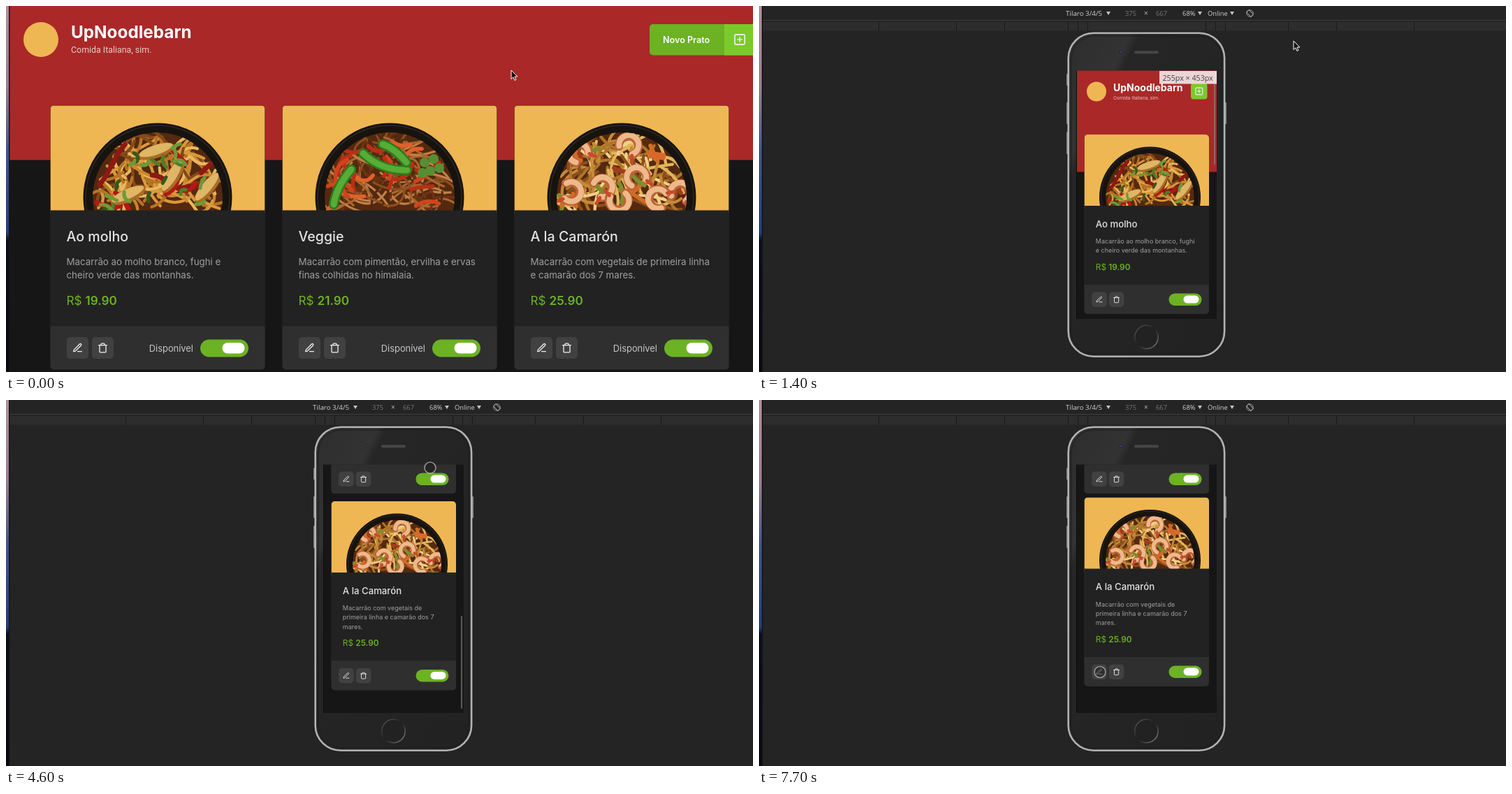
Animation of 1069 by 524 pixels, one loop 8000 ms. Source, as an HTML page:

```html
<!DOCTYPE html>
<html lang="pt-BR">
<head>
<meta charset="utf-8">
<title>Cardápio</title>
<style>
html, body { margin: 0; width: 100%; height: 100%; overflow: hidden; background: #242424; }
svg { display: block; }
text { font-family: Inter, sans-serif; white-space: pre; }
.ui { font-family: "Open Sans", sans-serif; }
.sub { font-family: Roboto, sans-serif; }
.icon { fill: none; stroke: #f2f2f2; stroke-width: 2; stroke-linecap: round; stroke-linejoin: round; }
</style>
</head>
<body>
<svg id="stage" width="1069" height="524" viewBox="0 0 1069 524"></svg>
<script>
const LOOP = 8000;
const GREEN = '#6cb223', LIME = '#7bca2b', RED = '#aa2828', AMBER = '#eeb754';

const rect = (x, y, w, h, fill, r = 0, extra = '') =>
  `<rect x="${x}" y="${y}" width="${w}" height="${h}" rx="${r}" fill="${fill}" ${extra}/>`;
const circle = (x, y, r, fill, extra = '') => `<circle cx="${x}" cy="${y}" r="${r}" fill="${fill}" ${extra}/>`;
const text = (x, y, size, fill, content, extra = '') =>
  `<text x="${x}" y="${y}" font-size="${size}" fill="${fill}" ${extra}>${content}</text>`;
const ui = (x, y, size, fill, content, extra = '') => text(x, y, size, fill, content, `class="ui" ${extra}`);
const line = (d, color, width, extra = '') =>
  `<path d="${d}" fill="none" stroke="${color}" stroke-width="${width}" stroke-linecap="round" ${extra}/>`;
const group = (x, y, body, extra = '') => `<g transform="translate(${x} ${y})" ${extra}>${body}</g>`;

const ICONS = {
  edit: 'M12 20h9M16.5 3.5a2.1 2.1 0 0 1 3 3L7 19l-4 1 1-4z',
  trash: 'M3 6h18M19 6v14a2 2 0 0 1-2 2H7a2 2 0 0 1-2-2V6M8 6V4a2 2 0 0 1 2-2h4a2 2 0 0 1 2 2v2',
  plus: 'M5 3h14a2 2 0 0 1 2 2v14a2 2 0 0 1-2 2H5a2 2 0 0 1-2-2V5a2 2 0 0 1 2-2zM12 8v8M8 12h8'
};
const icon = (name, cx, cy, size) =>
  `<path class="icon" d="${ICONS[name]}" transform="translate(${cx - size / 2} ${cy - size / 2}) scale(${size / 24})"/>`;

function randomizer(seed) {
  return () => (seed = (seed * 16807) % 2147483647) / 2147483647;
}

// Curved strands scattered over the visible upper half of a bowl.
function strands(rnd, count, colors, width, length) {
  let out = '';
  for (let i = 0; i < count; i++) {
    const a = -Math.PI * (rnd() * 1.16 - 0.08), d = 88 * Math.sqrt(rnd());
    const turn = rnd() * 360, bend = (rnd() - 0.5) * length;
    const len = length * (0.6 + rnd() * 0.6);
    const color = colors[Math.floor(rnd() * colors.length)];
    out += line(`M${-len / 2} 0Q0 ${bend.toFixed(1)} ${len / 2} 0`, color, width,
      `transform="translate(${(Math.cos(a) * d).toFixed(1)} ${(Math.sin(a) * d).toFixed(1)}) rotate(${turn.toFixed(0)})"`);
  }
  return out;
}

const chicken = (x, y, turn) => group(x, y,
  `<g transform="rotate(${turn})"><ellipse rx="27" ry="9.5" fill="#a96c25"/><ellipse cy="-2" rx="25" ry="7" fill="#dfb566"/></g>`);
const pod = d => line(d, '#2c7a1f', 14) + line(d, '#55ad35', 9);
const shrimp = (x, y, turn) => group(x, y, `<g transform="rotate(${turn})">` +
  line('M-11 9A14 14 0 1 1 12 8', '#bd6339', 12) + line('M-11 8A14 14 0 1 1 11 7', '#edb98b', 8) +
  line('M12 9l5 8', '#c94a2c', 5) + '</g>');

const TOPPINGS = [
  rnd => strands(rnd, 100, ['#d9993c', '#b87424', '#e8b85e', '#84491a', '#c98730'], 4.2, 42) +
    strands(rnd, 11, ['#b01a16', '#8f1813'], 7, 34) +
    chicken(-2, -66, -18) + chicken(22, -30, -58) + chicken(-42, -3, -24) + chicken(72, -14, -50) +
    strands(rnd, 20, ['#4d7f29', '#6c9a38', '#35591c'], 5, 15),
  rnd => strands(rnd, 125, ['#8d4e20', '#a9672f', '#6b3413', '#bf8147', '#532812'], 3.2, 46) +
    strands(rnd, 22, ['#d2431b', '#e0602a', '#b82f14'], 5.5, 34) +
    pod('M-38-63Q-12-38 25-39') + pod('M-10-76Q8-70 24-50') + pod('M-80 10Q-76-16-55-40') +
    [[50, -50], [63, -55], [58, -38], [71, -42], [47, -35]].map(p => circle(...p, 7, '#568e35')).join(''),
  rnd => strands(rnd, 100, ['#e3b55c', '#c58a37', '#f0d189', '#8c4e1d', '#ad7629'], 4.2, 42) +
    strands(rnd, 14, ['#7d8d2e', '#a33b1b', '#d26b24'], 6, 24) +
    rect(37, -65, 26, 10, '#d9682b', 3, 'transform="rotate(8 49 -60)"') +
    shrimp(-61, -63, -35) + shrimp(-28, -14, 65) + shrimp(22, -28, -20) +
    shrimp(-73, -8, 100) + shrimp(84, -6, 20) + shrimp(-4, 4, 170) + shrimp(53, 2, -70) + shrimp(10, -74, 35)
];
const dish = (topping, i) => `<g id="dish${i}">` + circle(0, 0, 106.5, '#17130f') +
  circle(0, 0, 103, 'none', 'stroke="#2b2724" stroke-width="1.5"') +
  `<g clip-path="url(#bowl)">${circle(0, 0, 93, '#54290f')}${topping(randomizer(71 + i * 37))}</g></g>`;

const DISHES = [
  { name: 'Ao molho', price: '19.90',
    wide: ['Macarrão ao molho branco, fughi e', 'cheiro verde das montanhas.'],
    slim: ['Macarrão ao molho branco, fughi', 'e cheiro verde das montanhas.'] },
  { name: 'Veggie', price: '21.90',
    wide: ['Macarrão com pimentão, ervilha e ervas', 'finas colhidas no himalaia.'],
    slim: ['Macarrão com pimentão, ervilha', 'e ervas finas colhidas no himalaia.'] },
  { name: 'A la Camarón', price: '25.90',
    wide: ['Macarrão com vegetais de primeira linha', 'e camarão dos 7 mares.'],
    slim: ['Macarrão com vegetais de', 'primeira linha e camarão dos 7', 'mares.'] }
];
const WIDE = { key: 'wide', w: 307, head: 150, plate: [153.5, 131.5, 1], pad: 23, title: [194, 19.6], desc: [228, 13.3, 19.6],
  price: [285, 17.2], foot: 316, end: 378, btn: [23.5, 59.5, 31, 15.5], btnY: 331.5,
  sw: [214.5, 335, 69, 25], knob: [246, 339.5, 32, 15.5], label: true };
const SLIM = { key: 'slim', w: 178.5, head: 102, plate: [94, 90, 0.681], pad: 16.3, title: [132.5, 13.2], desc: [156, 9, 13.4],
  price: [194, 11.8], foot: 215, end: 257, btn: [10.7, 35.3, 21.5, 10.6], btnY: 225.5,
  sw: [121, 227.5, 47, 17.5], knob: [142, 230.5, 22, 11], label: false };

function card(i, L) {
  const item = DISHES[i], lines = item[L.key], more = (lines.length - 2) * L.desc[2];
  const [size, glyph] = L.btn.slice(2), by = L.btnY + more;
  const at = ([x, y, w, h], fill, id) => rect(x, y + more, w, h, fill, h / 2, `id="${id}${L.key}${i}"`);
  const head = `<g clip-path="url(#head-${L.key})" id="photo${L.key}${i}">${rect(0, 0, L.w, L.head + 8, AMBER)}
    <use href="#dish${i}" transform="translate(${L.plate[0]} ${L.plate[1]}) scale(${L.plate[2]})"/></g>`;
  return rect(0, 0, L.w, L.end + more, '#222', 5) + head +
    rect(0, L.head, L.w, L.foot + more - L.head, '#222') +
    rect(0, L.foot + more, L.w, L.end - L.foot, '#2f2f2f', 5) + rect(0, L.foot + more, L.w, 8, '#2f2f2f') +
    text(L.pad, L.title[0], L.title[1], '#e3e3e3', item.name, 'font-weight="500"') +
    lines.map((s, n) => text(L.pad, L.desc[0] + n * L.desc[2], L.desc[1], '#a0a0a0', s)).join('') +
    text(L.pad, L.price[0] + more, L.price[1], GREEN, `R$ <tspan font-weight="600">${item.price}</tspan>`) +
    ['edit', 'trash'].map((name, n) => rect(L.btn[n], by, size, size, '#414141', 5) +
      icon(name, L.btn[n] + size / 2, by + size / 2, glyph)).join('') +
    (L.label ? text(204.5, 352, 12.9, '#c4c4c4', 'Disponível', 'text-anchor="end"') : '') +
    at(L.sw, GREEN, 'switch') + at(L.knob, '#fff', 'knob');
}

const strip = rect(0, 0, 5, 524, 'url(#wallpaper)') + rect(4, 0, 1.5, 524, '#14141a');

const desktop = rect(0, 0, 1069, 524, '#161616') + rect(5, 0, 1064, 220.5, RED) +
  circle(50, 48, 25, AMBER) +
  text(93, 46, 24.3, '#fff', 'UpNoodlebarn', 'font-weight="700"') +
  text(93, 67, 12.4, '#eac9c3', 'Comida Italiana, sim.', 'class="sub"') +
  rect(921, 26, 160, 44.5, GREEN, 5) + rect(1028, 26, 41, 44.5, LIME) +
  text(940, 52.5, 12.6, '#fff', 'Novo Prato', 'font-weight="600"') + icon('plus', 1050, 48, 19) +
  DISHES.map((_, i) => group(63.5 + i * 332, 142.5, card(i, WIDE))).join('');

const TABS = [['Elements', 157], ['Network', 216], ['Application', 271], ['Console', 338], ['Sources', 391],
  ['Performance', 443], ['Memory', 516], ['Security', 570], ['Audits', 623]];
const DRAWER = [['Console', 123], ["What's New", 172], ['Remote devices', 246]];
const tabs = (list, y, active) => list.map(([name, x], i) =>
  ui(x, y, 9.6, i === active ? '#fff' : '#a9a9a9', name)).join('');
const inspector = rect(93, 88, 758, 323.5, '#242424', 4, 'style="filter:drop-shadow(0 2px 5px #000c)"') +
  rect(93, 88, 758, 30, 'url(#titlebar)', 5) + rect(93, 109, 758, 20.5, '#333') +
  rect(93, 129.5, 758, 1, '#444') + rect(93, 389, 758, 22, '#333') + rect(93, 389, 758, 1, '#4a4a4a') +
  ['#cf5850', '#e2b035', '#4fa352'].map((c, i) => circle(105 + i * 19, 99, 5.5, c)).join('') +
  ui(159, 103, 10.4, '#c9c9c9',
    'devtools://devtools/bundled/devtools_app.html?remoteBase=https://chrome-devtools-frontend.appspot.com/serve_file/@449cb163497',
    'font-weight="600"') +
  rect(148, 109, 59, 20, '#000') + rect(165, 390, 74, 20, '#000') +
  rect(143, 112, 1, 14, '#444') + rect(823, 112, 1, 14, '#444') +
  tabs(TABS, 123, 0) + tabs(DRAWER, 404, 1) +
  rect(93.5, 88.5, 757, 322.5, 'none', 4, 'stroke="#171717"');

const RULER = [171, 282, 351, 442, 456, 470, 639, 653, 667, 757, 826, 937];
const caret = x => `<path d="M${x} 8h6l-3 5z" fill="#c4c4c4"/>`;
const toolbar = rect(0, 0, 1069, 524, '#242424') + rect(5, 20, 1064, 1, '#3f3f3f') +
  rect(5, 23, 1064, 12.5, '#2d2d2d') + RULER.map(x => rect(x, 23, 1, 12.5, '#191919')).join('') +
  ui(439, 14, 9.8, '#d0d0d0', 'Tilaro 3/4/5') + caret(497) + ui(524, 14, 9.4, '#777', '375') + ui(551, 14, 10, '#bbb', '×') +
  ui(568, 14, 9.4, '#777', '667') + ui(606, 14, 9.5, '#d0d0d0', '68%') + caret(628) +
  ui(642, 14, 9.4, '#d0d0d0', 'Online') + caret(674) +
  `<g fill="none" stroke="#9a9a9a"><circle cx="702.5" cy="10.5" r="4.7"/><rect x="700" y="6" width="5" height="9" transform="rotate(-45 702.5 10.5)"/></g>`;

const phone = [[440, 97, 17], [440, 138, 31], [440, 180, 32], [666, 138, 31]]
    .map(([x, y, h]) => rect(x, y, 3, h, '#858585', 1)).join('') +
  rect(442.7, 38.7, 223.4, 463, 'url(#shell)', 36, 'stroke="#b3b3b3" stroke-width="2.6"') +
  rect(447, 43, 215, 454.5, 'none', 32, 'stroke="#1c1c1c"') +
  circle(518, 66, 2.2, '#22223c') + circle(518, 66, 1, '#5555a0') + rect(537, 64.3, 35, 4, '#464646', 2) +
  circle(554.5, 474, 16.7, '#222', 'stroke="url(#home)" stroke-width="1.6"');

const page = rect(454, 92, 201, 145.5, RED) + circle(483, 122.5, 14, AMBER) +
  text(507, 121.5, 14, '#fff', 'UpNoodlebarn', 'font-weight="700"') +
  text(507, 133.5, 7.1, '#e2bbb5', 'Comida Italiana, sim.', 'class="sub"') +
  rect(618, 110.5, 23.5, 23, LIME, 4) + icon('plus', 629.8, 122, 13) +
  DISHES.map((_, i) => group(465.5, 184 + i * 268, card(i, SLIM), `id="slim${i}"`)).join('');

const mobile = toolbar + `<g id="phone">${phone}</g>` + rect(454, 92.5, 201, 355.5, '#161616') +
  `<g clip-path="url(#screen)"><g id="page">${page}</g>` +
  rect(651, 94, 2, 133, '#8a8a8a', 1, 'id="bar" opacity=".6"') + rect(454, 92, 1, 356, '#0c0c0c') + '</g>' +
  `<g id="tip">${rect(573, 93, 82, 18.5, '#f3e2e2', 0, 'opacity=".93"')}${ui(577.5, 106.5, 10.7, '#444', '255px × 453px')}</g>` +
  rect(586.5, 382, 47, 18, '#4b7296', 0, 'id="tap" opacity=".4"') +
  circle(0, 0, 8, '#1b1b1b', 'id="touch" fill-opacity=".52" stroke="#cfcbc0" stroke-opacity=".65" stroke-width="1.6"');

const gradient = (id, coords, stops) => `<linearGradient id="${id}" ${coords}>` +
  stops.map(([o, c]) => `<stop offset="${o}" stop-color="${c}"/>`).join('') + '</linearGradient>';
const DOWN = 'x1="0" y1="0" x2="0" y2="1"', SLANT = 'x1="0" y1="0" x2="1" y2="1"';
const clip = (id, shape) => `<clipPath id="${id}">${shape}</clipPath>`;

document.getElementById('stage').innerHTML = '<defs>' +
  gradient('wallpaper', DOWN, [[0, '#b08f96'], [0.22, '#9a7c8c'], [0.4, '#41548a'], [0.62, '#233f78'], [0.64, '#0b0d1c'], [1, '#08080f']]) +
  gradient('titlebar', DOWN, [[0, '#424242'], [1, '#303030']]) +
  gradient('shell', SLANT, [[0, '#2d2d2d'], [0.2, '#333'], [0.23, '#262626'], [1, '#222']]) +
  gradient('home', SLANT, [[0, '#5d5d5d'], [0.5, '#1d1d1d'], [1, '#8b8b8b']]) +
  clip('bowl', circle(0, 0, 93, '#000')) + clip('screen', rect(454, 92.5, 201, 355.5, '#000')) +
  [WIDE, SLIM].map(L => clip('head-' + L.key, rect(0, 0, L.w, L.head + 8, '#000', 5))).join('') +
  TOPPINGS.map(dish).join('') + '</defs>' +
  `<g id="desktop">${desktop}</g><g id="inspector">${inspector}</g><g id="mobile">${mobile}</g>${strip}` +
  '<path id="cursor" d="M0 0V12.5L2.9 9.8 4.9 14.4 6.9 13.5 5 9H8.9Z" fill="#111" stroke="#fff" stroke-width="1"/>';

// Each step keeps the values of the one before it.
const STEPS = [
  { t: 0, inspector: 0, mobile: false, phone: false, tip: true, cursor: [723, 92], touch: null, scroll: 0, bar: true,
    lift: 0, photo: 1, knob: 0, tint: GREEN, tap: false },
  { t: 500, inspector: 0.7 },
  { t: 600, inspector: 1 },
  { t: 1100, inspector: 0, mobile: true, cursor: [765, 50] },
  { t: 1400, phone: true },
  { t: 3900, cursor: null, tip: false, scroll: 334, touch: [608, 139] },
  { t: 4200, scroll: 420, touch: [607, 250] },
  { t: 4400, scroll: 520, touch: [607, 150] },
  { t: 4600, scroll: 575, touch: [607, 97] },
  { t: 4700, touch: [606, 97] },
  { t: 4900, touch: [598, 118] },
  { t: 5100, touch: [616, 381], bar: false },
  { t: 5500, touch: [616, 386] },
  { t: 5600, touch: [615, 388] },
  { t: 6000, touch: [615, 390], lift: 3.3, photo: 0.56, knob: 0.5, tint: '#8a9040', tap: true },
  { t: 6400, lift: 5.5, photo: 0.3, knob: 1, tint: '#c72828', tap: false },
  { t: 6800, photo: 0.6, knob: 0.5, tint: '#8a7c30' },
  { t: 7500, photo: 1, knob: 0, tint: GREEN, touch: [488, 385] },
  { t: 7700, touch: [488, 389.5] }
];
STEPS.forEach((step, i) => { STEPS[i] = { ...STEPS[i - 1], ...step }; });

const el = id => document.getElementById(id);
const show = (id, on) => el(id).setAttribute('display', on ? 'inline' : 'none');
const move = (id, x, y) => el(id).setAttribute('transform', `translate(${x} ${y})`);
const place = (id, point) => {
  show(id, point);
  if (point) move(id, ...point);
};

function render(s) {
  show('desktop', !s.mobile);
  show('mobile', s.mobile);
  show('inspector', s.inspector > 0);
  el('inspector').setAttribute('opacity', s.inspector);
  show('phone', s.phone);
  show('tip', s.tip);
  show('bar', s.bar);
  show('tap', s.tap);
  place('cursor', s.cursor);
  place('touch', s.touch);
  move('page', 0, -s.scroll);
  move('bar', 0, s.scroll * 215 / 575);
  move('slim2', 465.5, 720 - s.lift);
  el('photoslim2').setAttribute('opacity', s.photo);
  move('knobslim2', -17 * s.knob, 0);
  el('switchslim2').setAttribute('fill', s.tint);
}

const start = performance.now();
let current = null;
function tick() {
  const t = (performance.now() - start) % LOOP;
  const step = STEPS.findLast(s => s.t <= t);
  if (step !== current) render(current = step);
  requestAnimationFrame(tick);
}
tick();
</script>
</body>
</html>
```
